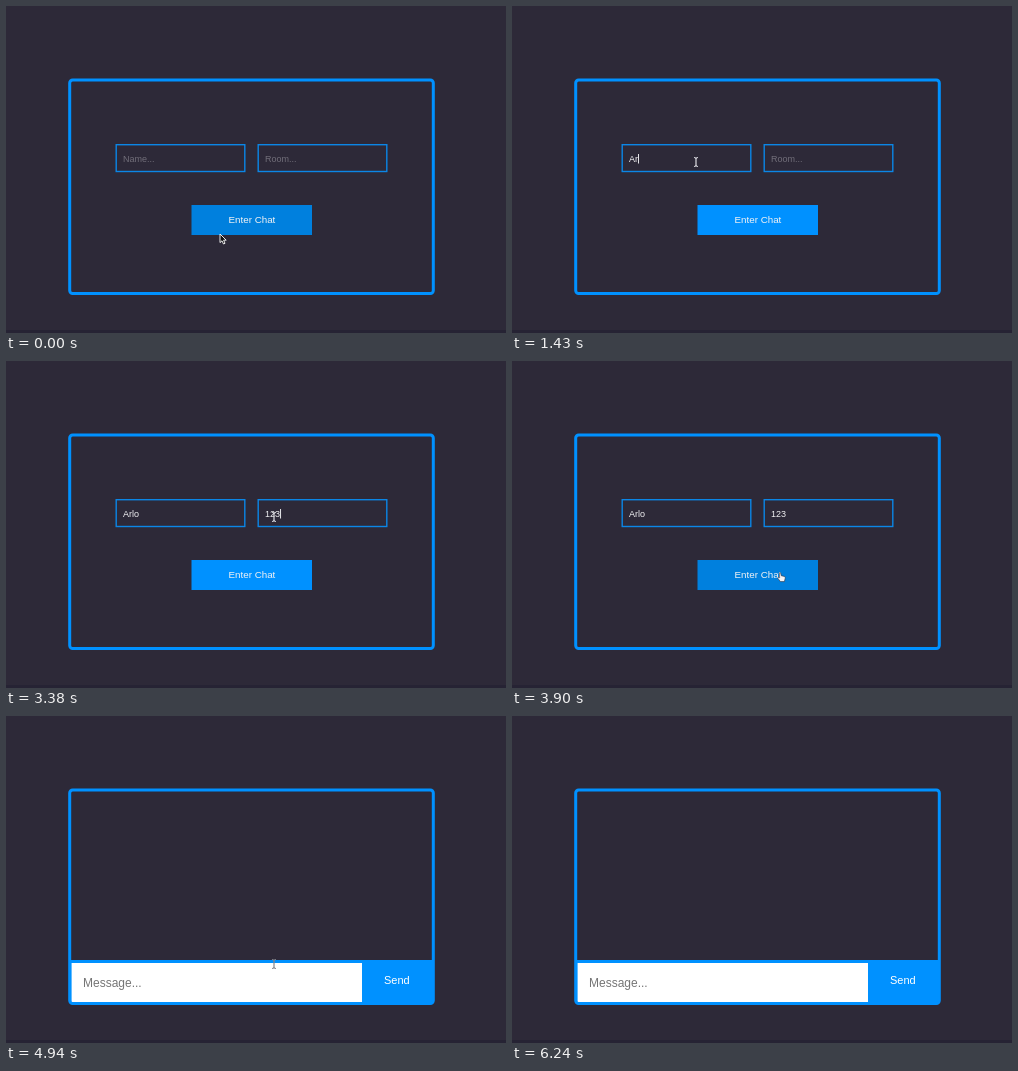
These frames come from a looping animation (500 px wide and 327 px high, 6630 ms). An HTML page:

```html
<!DOCTYPE html>
<html lang="en">
<head>
<meta charset="utf-8">
<title>Chat login</title>
<style>
html, body { margin: 0; width: 100%; height: 100%; overflow: hidden; background: #2d2938; }
svg { display: block; width: 100%; height: 100%; cursor: default; }
text { font-family: "Liberation Sans", Arial, sans-serif; font-size: 9px; fill: #f2f2f4; }
.hint { fill: #716e79; }
.field { fill: none; stroke: #0b86e6; stroke-width: 1.4; }
</style>
</head>
<body>
<svg viewBox="0 0 500 327">
  <rect width="500" height="327" fill="#2d2938"/>
  <rect y="324" width="500" height="3" fill="#262334"/>
  <g id="login">
    <rect class="field" x="110.2" y="138.7" width="128.6" height="26.8"/>
    <rect class="field" x="252.2" y="138.7" width="128.6" height="26.8"/>
    <text id="name" x="117" y="156"></text>
    <text id="room" x="259" y="156"></text>
    <rect id="caret" y="148" width="1" height="9.5" fill="#e4e4e8"/>
    <rect id="button" x="185.5" y="199" width="120.5" height="30"/>
    <text x="222.5" y="217.3" style="font-size:9.8px">Enter Chat</text>
  </g>
  <g id="chat">
    <rect x="64" y="244" width="363" height="43" fill="#0091ff"/>
    <rect x="65.5" y="247" width="290.5" height="39.3" fill="#fff"/>
    <text x="77" y="270.6" style="font-size:12px;fill:#757575">Message...</text>
    <text x="378" y="268.3" style="font-size:11px;fill:#fff">Send</text>
  </g>
  <rect x="63.7" y="74" width="363.6" height="213.5" rx="3" fill="none" stroke="#0091ff" stroke-width="3"/>
  <g id="pointer">
    <path id="arrow" d="M0 0V8.6L2 6.8L3.5 10L5 9.3L3.6 6.2H6.2Z" fill="#111" stroke="#fff" stroke-width=".9"/>
    <path id="beam" d="M-2 -4.5Q0 -4.5 0 -3V3Q0 4.5 -2 4.5M2 -4.5Q0 -4.5 0 -3V3Q0 4.5 2 4.5" fill="none" stroke-width="1.2"/>
    <path id="hand" d="M-.7 -4Q0 -4.8 .7 -4L1.2 -1.3L4.6 -.5Q5.4 0 5.2 1.2L4.4 4.6H.4L-2 1.4Q-2.4 .2 -1 .3L-.3 .8Z" fill="#f4f4f6" stroke="#33303c" stroke-width=".6"/>
  </g>
</svg>
<script>
const LOOP = 6630, TICK = 130;
const NAME = 'Arlo', ROOM = '123';
const el = id => document.getElementById(id);
const show = (id, on) => el(id).setAttribute('visibility', on ? 'inherit' : 'hidden');

// Pointer stops: time, x, y
const stops = [
  [0, 214, 228], [520, 184, 156], [2080, 184, 156], [2470, 268, 156],
  [3380, 268, 156], [3900, 268, 216], [4550, 268, 216],
  [5330, 268, 280], [5460, 268, 280], [6110, 268, 316], [LOOP, 268, 316]
];

function pointerAt(t) {
  const i = Math.max(1, stops.findIndex(s => s[0] >= t));
  const [a, b] = [stops[i - 1], stops[i]];
  const u = (t - a[0]) / (b[0] - a[0]);
  const k = u * u * (3 - 2 * u);
  return [a[1] + (b[1] - a[1]) * k, a[2] + (b[2] - a[2]) * k];
}

// Number of characters typed, given the time of each key press
const typed = (text, times, t) => text.slice(0, times.filter(k => t >= k).length);

function setField(id, value, hint) {
  el(id).textContent = value || hint;
  el(id).classList.toggle('hint', !value);
}

const inside = (x, y, l, t, r, b) => x >= l && x <= r && y >= t && y <= b;

function draw(time) {
  const t = Math.floor((time % LOOP) / TICK) * TICK;
  const chat = t >= 4420;
  const [x, y] = pointerAt(t);
  const name = typed(NAME, [1170, 1430, 1560, 1690], t);
  const room = typed(ROOM, [3120, 3250, 3380], t);

  show('login', !chat);
  show('chat', chat);
  setField('name', name, 'Name...');
  setField('room', room, 'Room...');

  const hover = inside(x, y, 185, 199, 306, 229);
  el('button').setAttribute('fill', hover ? '#0080de' : '#0091ff');

  const active = t < 2600 ? 'name' : 'room';
  const value = active === 'name' ? name : room;
  const start = active === 'name' ? 117 : 259;
  const width = value && !chat ? el(active).getComputedTextLength() : 0;
  el('caret').setAttribute('x', start + width);
  show('caret', !chat && (t >= 1040 && t < 2210 || t >= 2600 && t < 3770));

  const onField = chat
    ? inside(x, y, 65, 247, 356, 286)
    : inside(x, y, 110, 138, 239, 166) || inside(x, y, 252, 138, 381, 166);
  const onButton = t < 4680 && hover && y < 228;
  const kind = onField ? 'beam' : onButton ? 'hand' : 'arrow';
  for (const id of ['arrow', 'beam', 'hand']) show(id, id === kind);
  el('beam').setAttribute('stroke', chat ? '#85858b' : '#dcdce2');
  el('pointer').setAttribute('transform', `translate(${x} ${y})`);
  show('pointer', t < 6240);
}

const begin = performance.now();
function frame() {
  draw(performance.now() - begin);
  requestAnimationFrame(frame);
}
frame();
</script>
</body>
</html>
```
